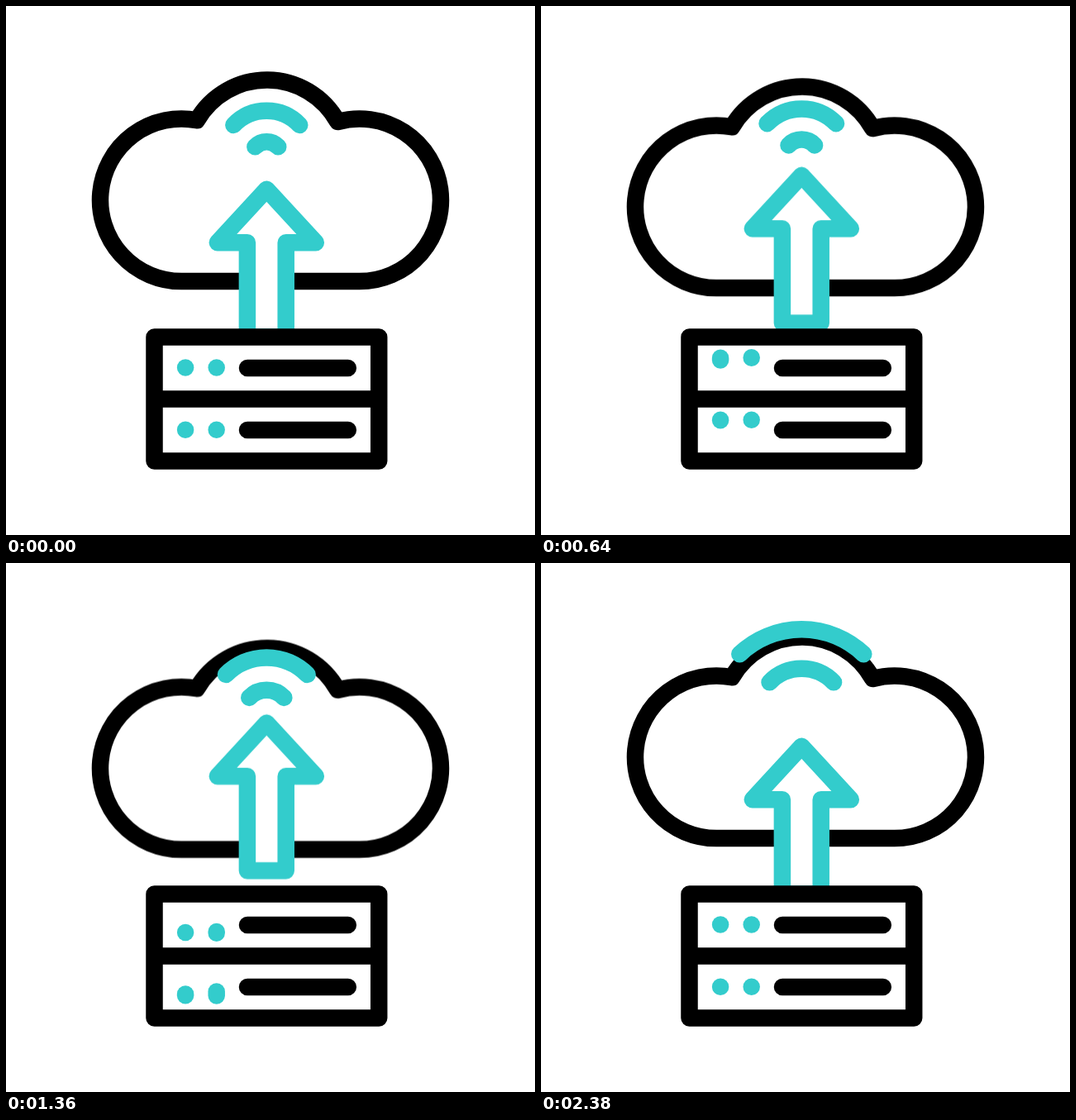
Recreate the animation shown at these times as an HTML page. Size 640 by 640 pixels, loop 2400 ms.

```html
<!DOCTYPE html>
<html lang="en">
<head>
<meta charset="utf-8">
<title>Cloud upload</title>
<style>
  html, body { margin: 0; width: 100%; height: 100%; overflow: hidden; background: #fff; }
  svg { display: block; width: 100%; height: 100%; }
  svg * { stroke-width: 20.5px; stroke-linecap: round; stroke-linejoin: round; }
  .ink { stroke: #000; fill: none; }
  .teal { stroke: #33cccc; fill: none; }
  .solid { fill: #fff; }

  .cloud, .arrow { animation: bob 2400ms cubic-bezier(.5, 0, .5, 1) infinite; }
  .cloud { --shift: 14px; }
  .arrow { --shift: -29.2px; }
  @keyframes bob {
    0%, 99.167%, 100% { transform: translateY(0); }
    49.583% { transform: translateY(var(--shift)); }
  }

  /* Four ripples per loop, all at full size for the last moment. */
  .outer { animation: outer 2400ms linear infinite; }
  .inner { animation: inner 2400ms linear infinite; }
  @keyframes outer {
    0%, 25.41%, 50%, 75% { d: path("M275.4 144A55 55 0 0 1 355.2 144"); }
    25%, 25.4%, 49.99%, 74.99%, 99.167%, 100% { d: path("M240.3 110.2A109 109 0 0 1 390.3 110.2"); }
  }
  @keyframes inner {
    0%, 24.8%, 49.59%, 74.38% { d: path("M301.4 170.4A19 19 0 0 1 329.2 170.4"); }
    24.79%, 49.58%, 74.37%, 99.167%, 100% { d: path("M276.5 144.3A53.8 53.8 0 0 1 354.1 144.3"); }
  }
</style>
</head>
<body>
<svg viewBox="0 0 640 640">
  <path class="ink cloud" d="M427.7 333.1H212.3A98.3 98.3 0 1 1 231 138.3A97.8 97.8 0 0 1 401.3 140.1A98.3 98.3 0 1 1 427.7 333.1Z"/>
  <path class="teal outer" d="M275.4 144A55 55 0 0 1 355.2 144"/>
  <path class="teal inner" d="M301.4 170.4A19 19 0 0 1 329.2 170.4"/>
  <path class="teal solid arrow" d="M315.3 221.8L255.8 286.2H291.9V400.6H338.7V286.2H374.8Z"/>
  <path class="ink solid" d="M179.5 400.4H451.2V550.5H179.5ZM179.5 475.4H451.2"/>
  <path class="ink" d="M292 438H413.8M292 513H413.8"/>
  <g class="teal" id="lights"></g>
</svg>
<script>
  const LOOP = 2400, TOP = -12, BOTTOM = 9.6, STRETCH = 10;

  const group = document.getElementById("lights");
  const lights = [];
  for (let row = 0; row < 2; row++) {
    for (let col = 0; col < 2; col++) {
      const line = document.createElementNS("http://www.w3.org/2000/svg", "line");
      const x = 217.1 + 37.6 * col;
      line.setAttribute("x1", x);
      line.setAttribute("x2", x);
      group.append(line);
      lights.push({ line, y: 437.4 + 75.4 * row, lag: row + col });
    }
  }

  const part = (t, start, length) => Math.min(1, Math.max(0, (t - start) / length));
  const half = x => Math.pow(2 * x, 2.22) / 2;
  const ease = x => x < .5 ? half(x) : 1 - half(1 - x);
  const bump = x => x < .5 ? Math.pow(2 * x, 1.6) : Math.pow(2 - 2 * x, .75);

  // Each light rises, falls and returns, later for every step to the right or down.
  function draw(t) {
    for (const { line, y, lag } of lights) {
      const rise = part(t, 72 * lag, 465);
      const fall = part(t, 455 + 120 * lag, 830);
      const back = part(t, 1475 + 108 * lag, 480);
      const mid = y + TOP * ease(rise) + (BOTTOM - TOP) * ease(fall) - BOTTOM * ease(back);
      const reach = STRETCH / 2 * (bump(rise) + bump(fall));
      line.setAttribute("y1", mid - reach);
      line.setAttribute("y2", mid + reach);
    }
  }

  let start;
  function tick(now) {
    start ??= now;
    draw((now - start) % LOOP);
    requestAnimationFrame(tick);
  }
  draw(0);
  requestAnimationFrame(tick);
</script>
</body>
</html>
```
